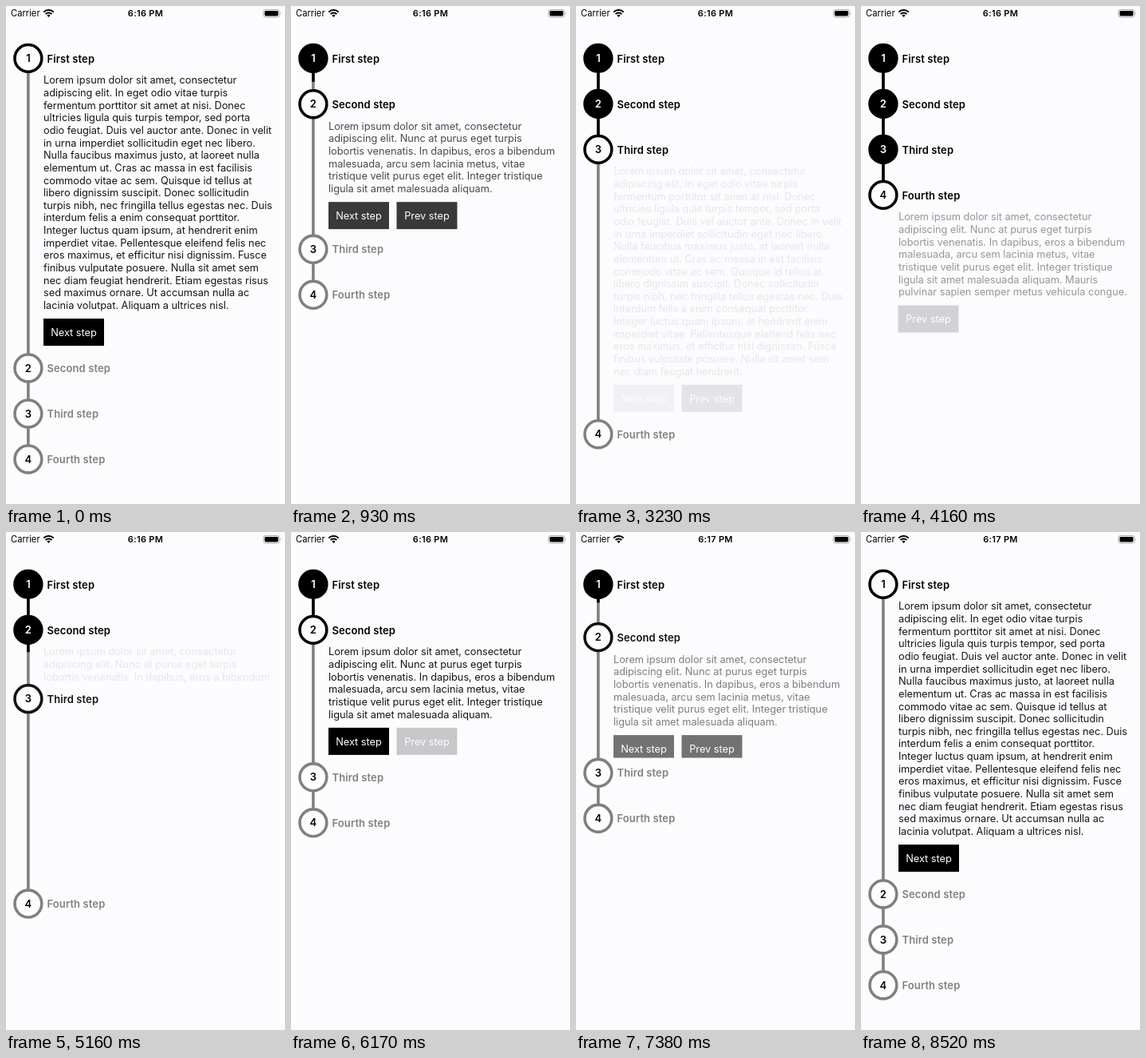
Animation of 350x623 px, one loop 8550 ms. Source, as an HTML page:

```html
<!DOCTYPE html>
<html lang="en">
<head>
<meta charset="utf-8">
<title>Vertical stepper</title>
<style>
  html, body { margin: 0; width: 100%; height: 100%; overflow: hidden; background: #fcfcff; }
  svg { display: block; width: 350px; height: 623px; }
  text { font: 400 12.8px Inter, sans-serif; letter-spacing: -.035px; }
  .body { fill: #161616; }
  .title { font-size: 13px; font-weight: 600; letter-spacing: .1px; }
  .digit { font-size: 13px; font-weight: 600; letter-spacing: 0; text-anchor: middle; }
  .status { font-size: 11.2px; letter-spacing: 0; }
  .clock { font-size: 11px; font-weight: 600; letter-spacing: .3px; text-anchor: middle; }
</style>
</head>
<body>
<svg id="stage" viewBox="0 0 350 623">
  <text class="status" x="6" y="13.3">Carrier</text>
  <g fill="none" stroke="#000" stroke-width="2">
    <path d="M47.2 7.6a8.9 8.9 0 0 1 12.6 0M49.6 10a5.5 5.5 0 0 1 7.8 0"/>
    <path d="M51.4 11.8a3 3 0 0 1 4.2 0l-2.1 2.2z" fill="#000" stroke="none"/>
  </g>
  <text id="clock" class="clock" x="175" y="13.3">6:16 PM</text>
  <rect x="323" y="4.5" width="20" height="9.5" rx="2.6" fill="none" stroke="#aaa"/>
  <rect x="324.5" y="6" width="17" height="6.5" rx="1.4"/>
  <path d="M344 7.6q1.4 1.6 0 3.2z" fill="#aaa"/>
</svg>
<script>
const LOOP = 8550, RADIUS = 18.7, CENTER = 27.9, PITCH = 57, LEADING = 15.63, TOP = 65.4;

const longText = `Lorem ipsum dolor sit amet, consectetur
adipiscing elit. In eget odio vitae turpis
fermentum porttitor sit amet at nisi. Donec
ultricies ligula quis turpis tempor, sed porta
odio feugiat. Duis vel auctor ante. Donec in velit
in urna imperdiet sollicitudin eget nec libero.
Nulla faucibus maximus justo, at laoreet nulla
elementum ut. Cras ac massa in est facilisis
commodo vitae ac sem. Quisque id tellus at
libero dignissim suscipit. Donec sollicitudin
turpis nibh, nec fringilla tellus egestas nec. Duis
interdum felis a enim consequat porttitor.
Integer luctus quam ipsum, at hendrerit enim
imperdiet vitae. Pellentesque eleifend felis nec
eros maximus, et efficitur nisi dignissim. Fusce
finibus vulputate posuere. Nulla sit amet sem
nec diam feugiat hendrerit. Etiam egestas risus
sed maximus ornare. Ut accumsan nulla ac
lacinia volutpat. Aliquam a ultrices nisl.`.split("\n");

const shortText = `Lorem ipsum dolor sit amet, consectetur
adipiscing elit. Nunc at purus eget turpis
lobortis venenatis. In dapibus, eros a bibendum
malesuada, arcu sem lacinia metus, vitae
tristique velit purus eget elit. Integer tristique
ligula sit amet malesuada aliquam. Mauris
pulvinar sapien semper metus vehicula congue.`.split("\n");

const bodies = [
  longText,
  [...shortText.slice(0, 5), "ligula sit amet malesuada aliquam."],
  [...longText.slice(0, 16), "nec diam feugiat hendrerit."],
  shortText,
];

// Button press time, layout start time, step left, step entered
const moves = [
  [-2000, -1000, 1, 0],
  [540, 660, 0, 1],
  [1570, 1770, 1, 2],
  [3020, 3240, 2, 3],
  [3920, 4205, 3, 2],
  [4850, 5123, 2, 1],
  [6010, 6295, 1, 0],
  [6940, 7172, 0, 1],
  [7920, 8200, 1, 0],
];

const stage = document.getElementById("stage");
const clock = document.getElementById("clock");

function set(node, attrs) {
  for (const key in attrs) node.setAttribute(key, attrs[key]);
}

function add(parent, tag, attrs, text = "") {
  const node = document.createElementNS("http://www.w3.org/2000/svg", tag);
  set(node, attrs);
  node.textContent = text;
  return parent.appendChild(node);
}

function addButton(parent, x, y, label) {
  const button = add(parent, "g", { transform: `translate(${x} ${y})` });
  add(button, "rect", { width: 76, height: 34 });
  add(button, "text", { x: 38, y: 21.9, fill: "#fff", "text-anchor": "middle" }, label);
  return button;
}

const steps = ["First", "Second", "Third", "Fourth"].map((name, i) => {
  const lines = bodies[i], last = i === 3;
  const root = add(stage, "g", {});
  const clip = add(add(root, "clipPath", { id: "clip" + i }), "rect", { y: RADIUS, width: 350 });
  const body = add(root, "g", { "clip-path": `url(#clip${i})` });
  lines.forEach((line, n) => add(body, "text", { class: "body", x: 47, y: 32.1 + n * LEADING }, line));

  const buttonY = 44.3 + (lines.length - 1) * LEADING;
  const next = last ? null : addButton(body, 47, buttonY, "Next step");
  const prev = i ? addButton(body, last ? 46.5 : 132.5, buttonY, "Prev step") : null;

  const track = { x: CENTER - 1.8, y: RADIUS - 1, width: 3.6 };
  const rail = add(root, "rect", { ...track, fill: "#808080" });
  const done = add(root, "rect", track);
  const ring = add(root, "circle", { cx: CENTER, r: RADIUS - 1.8, "stroke-width": 3.6 });
  const digit = add(root, "text", { class: "digit", x: CENTER, y: 4.7 }, i + 1);
  const title = add(root, "text", { class: "title", x: 51.5, y: 5.1 }, name + " step");
  return { root, clip, body, next, prev, rail, done, ring, digit, title,
           full: lines.length * LEADING + 33.6 };
});

const ramp = (t, start, length) => Math.min(1, Math.max(0, (t - start) / length));
const easeOut = p => 1 - (1 - p) ** 3;
const mix = (a, b, p) => Math.round(a + (b - a) * p);
const gray = v => `rgb(${v},${v},${v})`;

function draw(t) {
  const [press, start, from, to] = moves.filter(m => m[0] <= t).pop();
  const u = t - start, forward = to > from, low = Math.min(from, to);
  const delay = forward ? 55 : 13;
  const opened = easeOut(ramp(u, delay, 300));
  const closed = easeOut(ramp(u, 0, 300));
  const ink = forward ? ramp(u, 0, 240) : 1 - ramp(u, 0, 240);
  const fill = forward ? ramp(u, 0, 150) : 1 - ramp(u, 80, 120);
  const trail = forward ? ramp(u, 180, 170) : 1 - ramp(u, -10, 60);
  const touch = Math.min(1, 1 - .8 * ramp(t, press, 150) + .8 * ramp(u, -100, 250));
  const upTo = (i, edge, value) => i < edge ? 1 : i === edge ? value : 0;

  let y = TOP;
  steps.forEach((s, i) => {
    const open = i === to ? opened : i === from ? 1 - closed : 0;
    const alpha = i === to ? ramp(u, delay, 280) : i === from ? 1 - ramp(u, -100, 100) : 0;
    const height = s.full * open;
    const gap = height + PITCH - 2 * RADIUS;
    const tone = gray(mix(128, 0, upTo(i, low + 1, ink)));
    const filled = upTo(i, low, fill);
    const railLength = i < 3 ? gap + 2 : 0;

    set(s.root, { transform: `translate(0 ${y})` });
    set(s.clip, { height: gap });
    set(s.body, { opacity: alpha });
    set(s.rail, { height: railLength });
    set(s.done, { height: railLength * upTo(i, low, trail) });
    set(s.ring, { stroke: tone, fill: gray(mix(254, 0, filled)) });
    set(s.digit, { fill: gray(mix(0, 255, filled)) });
    set(s.title, { fill: tone });
    if (s.next) set(s.next, { opacity: i === from && forward ? touch : 1 });
    if (s.prev) set(s.prev, { opacity: i === from && !forward ? touch : 1 });
    y += PITCH + height;
  });
  clock.textContent = t < 6960 ? "6:16 PM" : "6:17 PM";
}

function tick() {
  draw(performance.now() % LOOP);
  requestAnimationFrame(tick);
}
tick();
</script>
</body>
</html>
```
